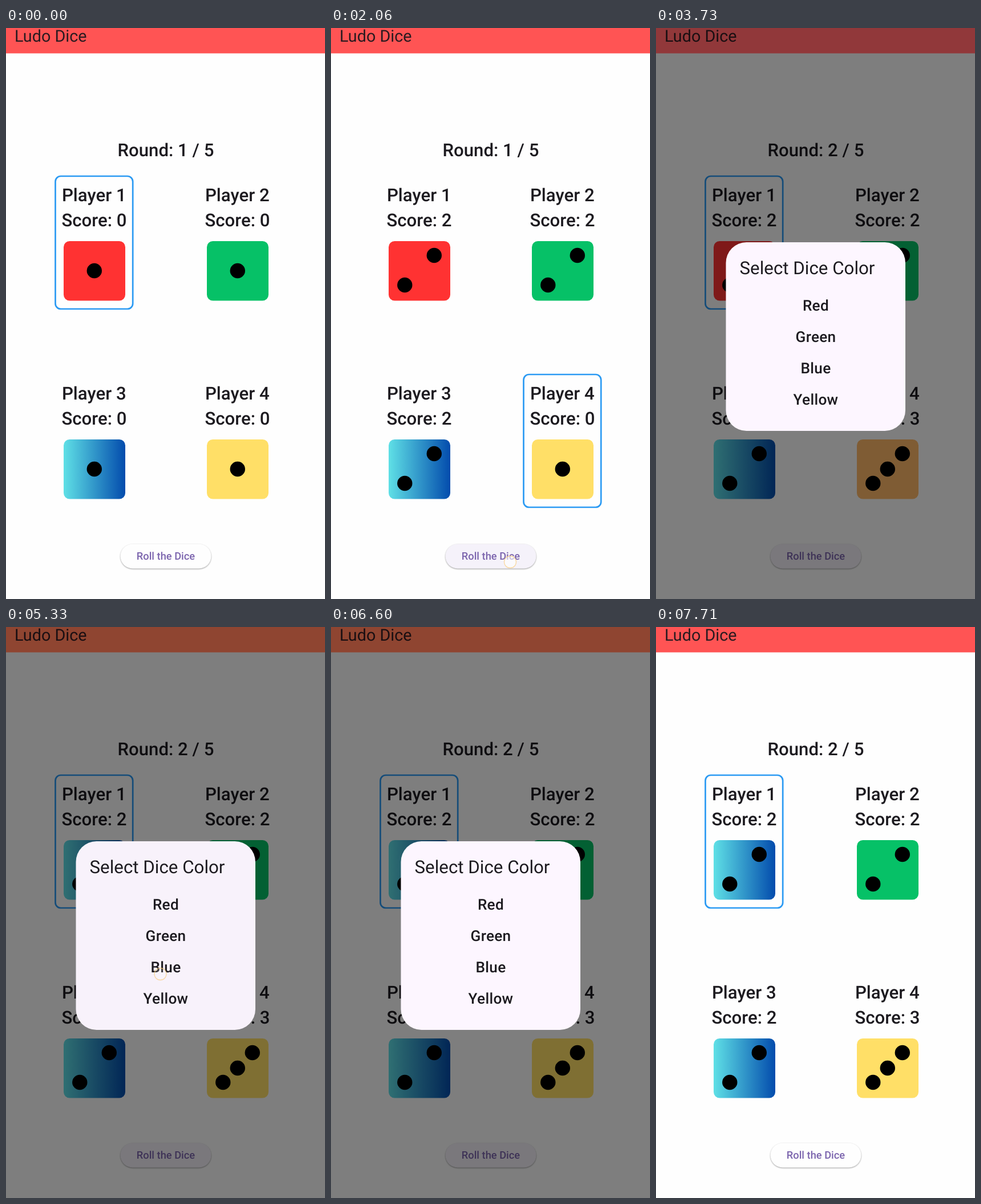
An HTML page that plays this animation: 559x1002 px, repeating every 8 s.

```html
<!DOCTYPE html>
<html lang="en">
<head>
<meta charset="utf-8">
<title>Ludo Dice</title>
<style>
html, body { margin: 0; width: 100%; height: 100%; overflow: hidden; background: #fefefe; }
svg { display: block; width: 559px; height: 1002px; font-family: Roboto, Arial, sans-serif; fill: #1d1b20; text-rendering: geometricPrecision; }
.body { font-size: 31.2px; font-weight: 500; text-anchor: middle; }
.option { font-size: 26.2px; font-weight: 500; letter-spacing: .3px; text-anchor: middle; }
#pill { filter: drop-shadow(0 1.2px 1px rgba(0, 0, 0, .38)); }
</style>
</head>
<body>
<svg id="stage" viewBox="0 0 559 1002">
  <defs>
    <linearGradient id="blue">
      <stop offset="0" stop-color="#5fe0e6"/>
      <stop offset="1" stop-color="#034cad"/>
    </linearGradient>
  </defs>
  <rect width="559" height="1002" fill="#fefefe"/>
  <text id="round" class="body" x="280" y="225"></text>
  <g id="players"></g>
  <rect id="pill" x="200.5" y="905.5" width="159" height="43" rx="21.5"/>
  <text x="280" y="932.5" font-size="18.3" font-weight="500" text-anchor="middle" fill="#7c65ae">Roll the Dice</text>
  <rect id="dim" width="559" height="1002" opacity=".5" fill="#000"/>
  <rect id="bar" width="559" height="44.5"/>
  <text id="title" x="15" y="24" font-size="28.75">Ludo Dice</text>
  <g id="dialog">
    <rect id="sheet" x="122.5" y="376" width="314.5" height="331" rx="36"/>
    <text x="146.5" y="432" font-size="31.3">Select Dice Color</text>
  </g>
  <circle id="touch" r="10.5" stroke-width="1.3"/>
</svg>
<script>
const LOOP = 8000;
const NS = "http://www.w3.org/2000/svg";
const $ = id => document.getElementById(id);

function add(parent, tag, attrs, text) {
  const el = document.createElementNS(NS, tag);
  for (const key in attrs) el.setAttribute(key, attrs[key]);
  if (text) el.textContent = text;
  return parent.appendChild(el);
}
const show = (el, on) => el.setAttribute("visibility", on ? "visible" : "hidden");

// Pips run from bottom left, through the centre, to top right.
const PIPS = [[-25.5, 25], [0, 0], [26, -27]];
const FACES = { 1: [1], 2: [0, 2], 3: [0, 1, 2] };
const COLORS = { red: "#ff3232", green: "#06c167", blue: "url(#blue)", yellow: "#ffdf67", orange: "#ffba68" };

const players = [0, 1, 2, 3].map(i => {
  const g = add($("players"), "g", { transform: `translate(${i % 2 * 251} ${i > 1 ? 348 : 0})` });
  const ring = add(g, "rect", { x: 86.5, y: 260, width: 135.7, height: 233, rx: 9.5, fill: "none", stroke: "#2b9af3", "stroke-width": 2.7 });
  add(g, "text", { class: "body", x: 154.3, y: 304 }, `Player ${i + 1}`);
  const score = add(g, "text", { class: "body", x: 154.5, y: 348 });
  const die = add(g, "rect", { x: 101, y: 374, width: 108, height: 104.5, rx: 10.5 });
  const pips = PIPS.map(([x, y]) => add(g, "circle", { cx: 154.8 + x, cy: 426 + y, r: 13.2, fill: "#000" }));
  return { ring, score, die, pips };
});

["Red", "Green", "Blue", "Yellow"].forEach((name, i) =>
  add($("dialog"), "text", { class: "option", x: 280, y: 495.5 + i * 55 }, name));

// Each step changes only what it names; touch is [x, y, fill opacity].
const STEPS = [
  { at: 0, round: 1, turn: 0, scores: [0, 0, 0, 0], colors: ["red", "green", "blue", "yellow"],
    pressed: false, open: false, touch: null, bar: "#ff5454", sheet: "#fdf6ff" },
  { at: 940, turn: 1, scores: [2, 0, 0, 0], pressed: true, touch: [314, 937, .6] },
  { at: 1330, turn: 2, scores: [2, 2, 0, 0], touch: [314, 936, .6] },
  { at: 1680, turn: 3, scores: [2, 2, 2, 0], pressed: false, touch: null },
  { at: 2060, pressed: true, touch: [314, 937, .6] },
  { at: 2430, round: 2, turn: 0, scores: [2, 2, 2, 3], touch: null },
  { at: 2790, pressed: false },
  { at: 3120, touch: [186, 428, .65] },
  { at: 3450, touch: null },
  { at: 3730, open: true, bar: "#91383a", colors: ["red", "green", "blue", "orange"] },
  { at: 4540, colors: ["red", "green", "blue", "yellow"] },
  { at: 5330, bar: "#8f4531", sheet: "#f8f2fb", colors: ["blue", "green", "blue", "yellow"], touch: [270.5, 609, .15] },
  { at: 5490, open: false, bar: "#ff5454", touch: null },
  { at: 6260, touch: [406, 456, .7] },
  { at: 6600, open: true, bar: "#8f4531", sheet: "#fdf6ff", touch: null },
  { at: 7360, touch: [309, 544, .65] },
  { at: 7710, open: false, bar: "#ff5454", touch: null }
];

function render(time) {
  const s = Object.assign({}, ...STEPS.filter(step => step.at <= time));
  $("round").textContent = `Round: ${s.round} / 5`;
  players.forEach((p, i) => {
    show(p.ring, s.turn === i);
    p.score.textContent = `Score: ${s.scores[i]}`;
    p.die.setAttribute("fill", COLORS[s.colors[i]]);
    p.pips.forEach((pip, k) => show(pip, FACES[s.scores[i] || 1].includes(k)));
  });
  $("pill").setAttribute("fill", s.pressed || s.open ? "#f5f2fa" : "#fefefe");
  $("bar").setAttribute("fill", s.bar);
  $("title").setAttribute("fill", s.open ? "#1a0f12" : "#2a1b20");
  $("sheet").setAttribute("fill", s.sheet);
  show($("dim"), s.open);
  show($("dialog"), s.open);
  show($("touch"), s.touch);
  if (s.touch) {
    const [x, y, fill] = s.touch;
    $("touch").setAttribute("cx", x);
    $("touch").setAttribute("cy", y);
    $("touch").setAttribute("fill", `rgba(255,255,255,${fill})`);
    $("touch").setAttribute("stroke", "rgba(250,205,125,.7)");
  }
}

const start = performance.now();
function frame() {
  render((performance.now() - start) % LOOP);
  requestAnimationFrame(frame);
}
frame();
</script>
</body>
</html>
```
